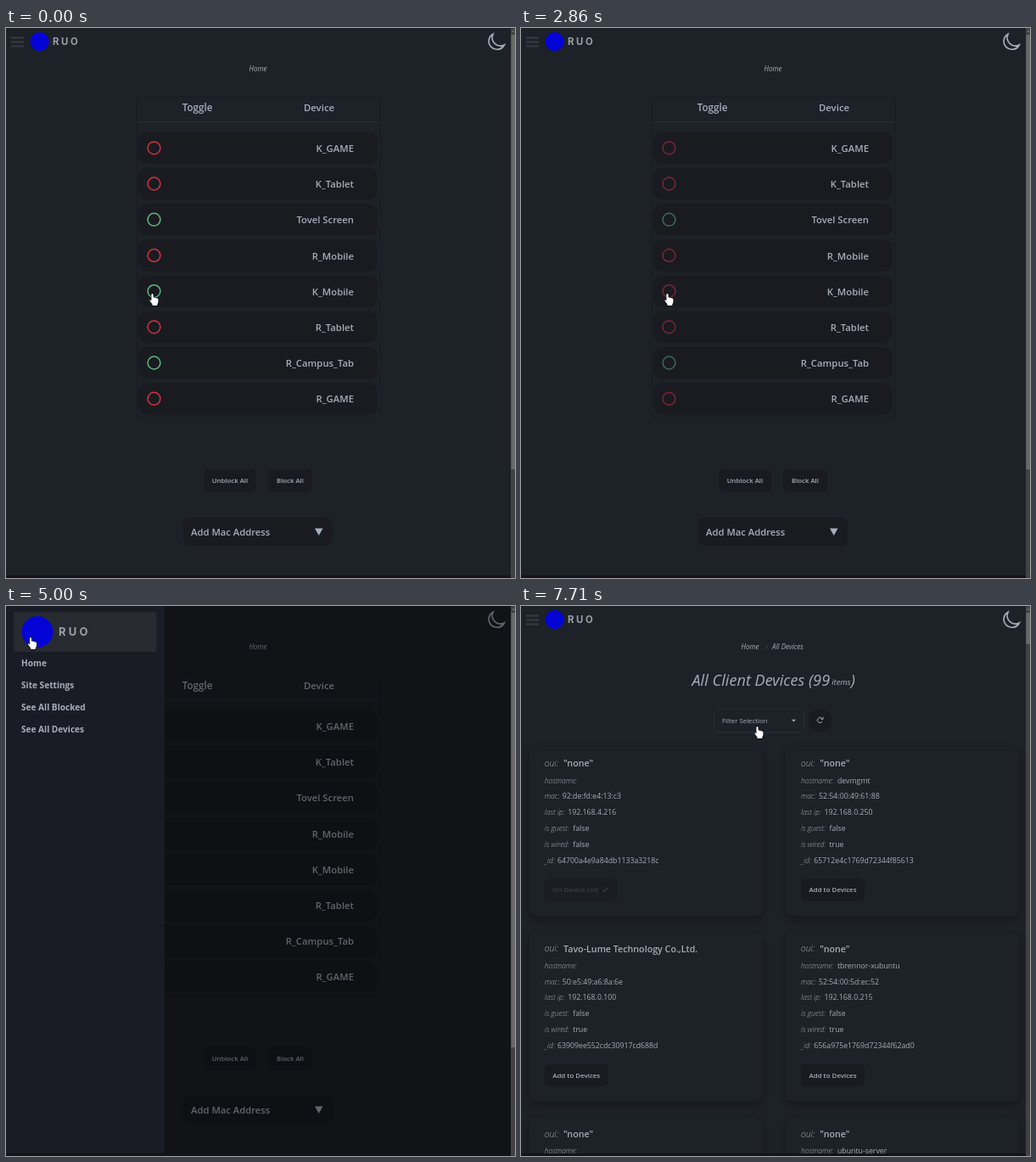
These frames come from a looping animation (600 px wide and 648 px high, 8 s). An HTML page with a canvas:

```html
<!DOCTYPE html>
<html lang="en">
<head>
<meta charset="utf-8">
<title>Device manager</title>
<style>
html, body { margin: 0; width: 100%; height: 100%; overflow: hidden; background: #1d2128; }
canvas { display: block; }
</style>
</head>
<body>
<canvas id="stage" width="600" height="648"></canvas>
<script>
const ctx = document.getElementById('stage').getContext('2d');
const LOOP = 8000, FPS = 7, LAST_STEP = 54;
const BG = '#1d2128', PANEL = '#191b21', INK = '#a6adbb';
const RED = '#d5323f', GREEN = '#5fb780';

// Times of the events in ms
const BLOCKED = 290, ALLOWED = 3100, OPEN = 4430, NAVIGATE = 6000, CLOSE = 7280, SLIDE = 320;

const DEVICES = ['K_GAME', 'K_Tablet', 'Tovel Screen', 'R_Mobile',
  'K_Mobile', 'R_Tablet', 'R_Campus_Tab', 'R_GAME'];
const ALLOWED_ROWS = [2, 6], TOGGLED_ROW = 4;
const MENU = ['Home', 'Site Settings', 'See All Blocked', 'See All Devices'];

const CLIENTS = [
  { oui: '"none"', host: '', mac: '92:de:fd:e4:13:c3', ip: '192.168.4.216', wired: false, id: '64700a4e9a84db1133a3218c', listed: true },
  { oui: '"none"', host: 'devmgmt', mac: '52:54:00:49:61:88', ip: '192.168.0.250', wired: true, id: '65712e4c1769d72344f85613' },
  { oui: 'Tavo-Lume Technology Co.,Ltd.', host: '', mac: '50:e5:49:a6:8a:6e', ip: '192.168.0.100', wired: true, id: '63909ee552cdc30917cd688d' },
  { oui: '"none"', host: 'tbrennor-xubuntu', mac: '52:54:00:5d:ec:52', ip: '192.168.0.215', wired: true, id: '656a975e1769d72344f62ad0' },
  { oui: '"none"', host: '' },
  { oui: '"none"', host: 'ubuntu-server' }
];

// Pointer path: time, x, y of the hot spot
const PATH = [
  [0, 172.5, 313], [330, 172.5, 313], [900, 116.5, 315], [1500, 116.5, 315],
  [2100, 172.5, 313], [3000, 172.5, 313], [3430, 93, 300], [4000, 13, 29.5],
  [4150, 13, 17], [4650, 13, 17], [5000, 29, 37], [5400, 45, 143],
  [6100, 45, 143], [6800, 290.5, 101.5], [7300, 290.5, 101.5], [7710, 278.5, 142]
];
const HAND = new Path2D('M-1.1 .8Q0 -.9 1.1 .8V4.6Q2.2 3.9 3.2 5Q4.5 4.4 5.2 5.6Q6.7 5.2 7 6.8V9.5Q6.8 11.5 5.8 12.6V14H0V12.6L-3 8.6Q-3.6 7.2 -2.4 7.2L-1.1 8.4Z');
const ARROW = new Path2D('M0 0V10L2.3 8L4 11.3L5.4 10.7L3.9 7.4L6.9 7.2Z');
const MOON = new Path2D('M574 7.3A9.6 9.6 0 1 0 587.3 20A9.8 9.8 0 0 1 574 7.3Z');

const clamp = v => Math.max(0, Math.min(1, v));
const easeOut = v => 1 - (1 - clamp(v)) ** 2;
const easeInOut = v => v * v * (3 - 2 * v);

function text(str, x, mid, size, { weight = 400, italic = false, color = INK, align = 'left', family = 'Open Sans' } = {}) {
  ctx.font = `${italic ? 'italic ' : ''}${weight} ${size}px "${family}", sans-serif`;
  ctx.textAlign = align;
  ctx.fillStyle = color;
  ctx.fillText(str, x, mid + size * 0.36);
  return ctx.measureText(str).width;
}

function box(x, y, w, h, r, fill, stroke) {
  ctx.beginPath();
  ctx.roundRect(x, y, w, h, r);
  if (fill) { ctx.fillStyle = fill; ctx.fill(); }
  if (stroke) { ctx.strokeStyle = stroke; ctx.lineWidth = 1; ctx.stroke(); }
}

function disc(x, y, r, fill) {
  ctx.beginPath();
  ctx.arc(x, y, r, 0, 7);
  ctx.fillStyle = fill;
  ctx.fill();
}

function line(points, color, width) {
  ctx.beginPath();
  points.forEach(([x, y]) => ctx.lineTo(x, y));
  ctx.strokeStyle = color;
  ctx.lineWidth = width;
  ctx.stroke();
}

function triangle(x, y, w, h) {
  ctx.beginPath();
  ctx.moveTo(x, y);
  ctx.lineTo(x + w, y);
  ctx.lineTo(x + w / 2, y + h);
  ctx.fillStyle = INK;
  ctx.fill();
}

function wordmark(x, mid, size, gap) {
  ctx.letterSpacing = gap + 'px';
  text('RUO', x, mid, size, { weight: 700, color: '#9ba0a9', family: 'Inter' });
  ctx.letterSpacing = '0px';
}

function header() {
  for (const y of [11.5, 16.5, 21.5]) line([[6, y], [21, y]], '#373b43', 2);
  disc(39.5, 16, 11, '#0404d6');
  wordmark(55, 16.3, 11.4, 2.6);
  ctx.strokeStyle = INK;
  ctx.lineWidth = 1.7;
  ctx.stroke(MOON);
}

function ring(y, color, alpha) {
  ctx.globalAlpha = alpha;
  ctx.beginPath();
  ctx.arc(174.5, y, 7.4, 0, 7);
  ctx.strokeStyle = color;
  ctx.lineWidth = 1.5;
  ctx.stroke();
  ctx.globalAlpha = 1;
}

function homePage(t) {
  text('Home', 297, 48.5, 8.1, { italic: true, align: 'center' });
  box(154, 81, 287, 378, 4, null, '#1a1d23');
  line([[154, 111], [441, 111]], '#2b2f37', 1.2);
  const head = { weight: 600, align: 'center' };
  text('Toggle', 225.5, 93.5, 11.6, head);
  text('Device', 369, 93.5, 11.4, head);

  const alpha = 0.75 + 0.25 * Math.cos(t * Math.PI / 1000);
  DEVICES.forEach((name, i) => {
    const y = 141.3 + i * 42.2;
    const toggled = i === TOGGLED_ROW && (t < BLOCKED || t >= ALLOWED);
    box(156, y - 18.5, 282, 37, 10, PANEL);
    ring(y, toggled || ALLOWED_ROWS.includes(i) ? GREEN : RED, alpha);
    text(name, 410, y + 0.7, 11.3, { weight: 600, align: 'right' });
  });

  box(233, 520, 62, 26.5, 5, PANEL);
  box(309, 520, 52, 26.5, 5, PANEL);
  text('Unblock All', 264, 533.5, 7.8, head);
  text('Block All', 335, 533.5, 7.8, head);
  box(209, 577, 176, 33, 8, PANEL);
  text('Add Mac Address', 218, 593.5, 11.25, { weight: 600 });
  triangle(364, 589.5, 9.5, 8.5);
}

function card(c, x, y) {
  ctx.save();
  ctx.shadowColor = 'rgba(0,0,0,.28)';
  ctx.shadowBlur = 9;
  ctx.shadowOffsetY = 4;
  box(x - 18, y - 20, 276, 200, 10, BG);
  ctx.restore();

  text('oui:', x, y, 10.5, { italic: true, weight: 300 });
  text(c.oui, x + 22.3, y, 10.7, { weight: 600 });
  const rows = [['hostname:', c.host, 43], ['mac:', c.mac, 21], ['last ip:', c.ip, 27.5],
    ['is guest:', 'false', 33.5], ['is wired:', String(c.wired), 33.5], ['_id:', c.id, 15.3]];
  rows.forEach(([label, value, dx], i) => {
    const mid = y + 20 + i * 18.8;
    text(label, x, mid, 8.6, { italic: true, weight: 300 });
    if (value) text(value, x + dx, mid, 8.75);
  });

  const mid = y + 149;
  if (c.listed) {
    box(x, mid - 13, 86, 26, 5, '#1a1d23');
    text('On Device List', x + 9.5, mid, 7.9, { weight: 600, color: '#3c4149' });
    line([[x + 68.5, mid], [x + 70.5, mid + 2.2], [x + 74.5, mid - 2.8]], '#3c4149', 1.1);
  } else {
    box(x, mid - 13, 75, 26, 5, PANEL);
    text('Add to Devices', x + 37.5, mid, 7.9, { weight: 600, align: 'center' });
  }
}

function devicesPage() {
  text('Home', 259.5, 48.5, 8.1, { italic: true });
  line([[288, 46.2], [290.2, 48.5], [288, 50.8]], '#4d525c', 0.9);
  text('All Devices', 296, 48.5, 8.1, { italic: true });

  const title = { italic: true, weight: 400 };
  let x = 201.5;
  x += text('All Client Devices (99', x, 87, 18.2, title) + 2;
  x += text('items', x, 89.6, 9.5, title);
  text(')', x, 87, 18.2, title);

  box(227.5, 121, 106, 28, 7, null, '#2a2e36');
  text('Filter Selection', 237, 135, 7.85);
  triangle(319, 133.7, 5, 2.8);
  disc(352.5, 134.5, 13.2, PANEL);
  ctx.beginPath();
  ctx.arc(352.5, 134.5, 3.1, 0.5, 5.6);
  ctx.strokeStyle = INK;
  ctx.lineWidth = 1;
  ctx.stroke();
  line([[356, 130.8], [356, 133.3], [353.4, 133.3]], INK, 1);

  CLIENTS.forEach((c, i) => card(c, i % 2 ? 330 : 27.7, 185.5 + Math.floor(i / 2) * 218.2));
}

function drawer(shown, px, py) {
  if (shown <= 0) return;
  ctx.fillStyle = `rgba(0,0,0,${0.42 * shown})`;
  ctx.fillRect(0, 0, 595, 648);
  ctx.save();
  ctx.translate(187 * (shown - 1), 0);
  ctx.fillStyle = '#191c24';
  ctx.fillRect(0, 0, 187, 648);
  const hover = px > 9 && px < 177;
  if (hover && py > 7 && py < 54) box(9, 7, 168.5, 47, 4, '#272a31');
  disc(37, 30.5, 18.5, '#0404d6');
  wordmark(62, 30.7, 13, 3.2);
  MENU.forEach((item, i) => {
    const mid = 67.7 + i * 25.8;
    if (hover && Math.abs(py - mid) < 12.5) box(9, mid - 12.5, 168.5, 25, 4, '#272a31');
    text(item, 18, mid, 10.1, { weight: 700 });
  });
  ctx.restore();
}

function chrome(thumbEnd) {
  ctx.fillStyle = '#16111b';
  ctx.fillRect(0, 645, 595, 3);
  ctx.fillStyle = '#424242';
  ctx.fillRect(595, 0, 5, 648);
  ctx.fillStyle = '#686868';
  ctx.fillRect(595.5, 8, 4.5, thumbEnd - 8);
  ctx.beginPath();
  ctx.moveTo(596, 5);
  ctx.lineTo(598, 2);
  ctx.lineTo(600, 5);
  ctx.fill();
}

function pointerAt(t) {
  const next = PATH.findIndex(p => p[0] > t);
  if (next < 0) return PATH[PATH.length - 1].slice(1);
  const [t0, x0, y0] = PATH[next - 1], [t1, x1, y1] = PATH[next];
  const k = easeInOut((t - t0) / (t1 - t0));
  return [x0 + (x1 - x0) * k, y0 + (y1 - y0) * k];
}

function pointer(x, y, t) {
  const onRing = x > 165 && t < OPEN;
  const shape = onRing || y < 27 || t >= OPEN ? HAND : ARROW;
  ctx.save();
  ctx.translate(x, y);
  ctx.lineJoin = 'round';
  ctx.strokeStyle = '#000';
  ctx.lineWidth = 1.3;
  ctx.stroke(shape);
  ctx.fillStyle = '#fff';
  ctx.fill(shape);
  ctx.restore();
}

function draw(t) {
  const [x, y] = pointerAt(t);
  const shown = easeOut((t - OPEN) / SLIDE) - easeOut((t - CLOSE) / SLIDE);
  const listing = t >= NAVIGATE;
  ctx.fillStyle = BG;
  ctx.fillRect(0, 0, 600, 648);
  listing ? devicesPage() : homePage(t);
  header();
  drawer(shown, x, y);
  chrome(listing ? 45 : 520);
  pointer(x, y, t);
}

const start = performance.now();
function tick() {
  const t = (performance.now() - start) % LOOP;
  const step = Math.min(LAST_STEP, Math.floor((t + 5) * FPS / 1000));
  draw(step * 1000 / FPS);
  requestAnimationFrame(tick);
}
tick();
</script>
</body>
</html>
```
